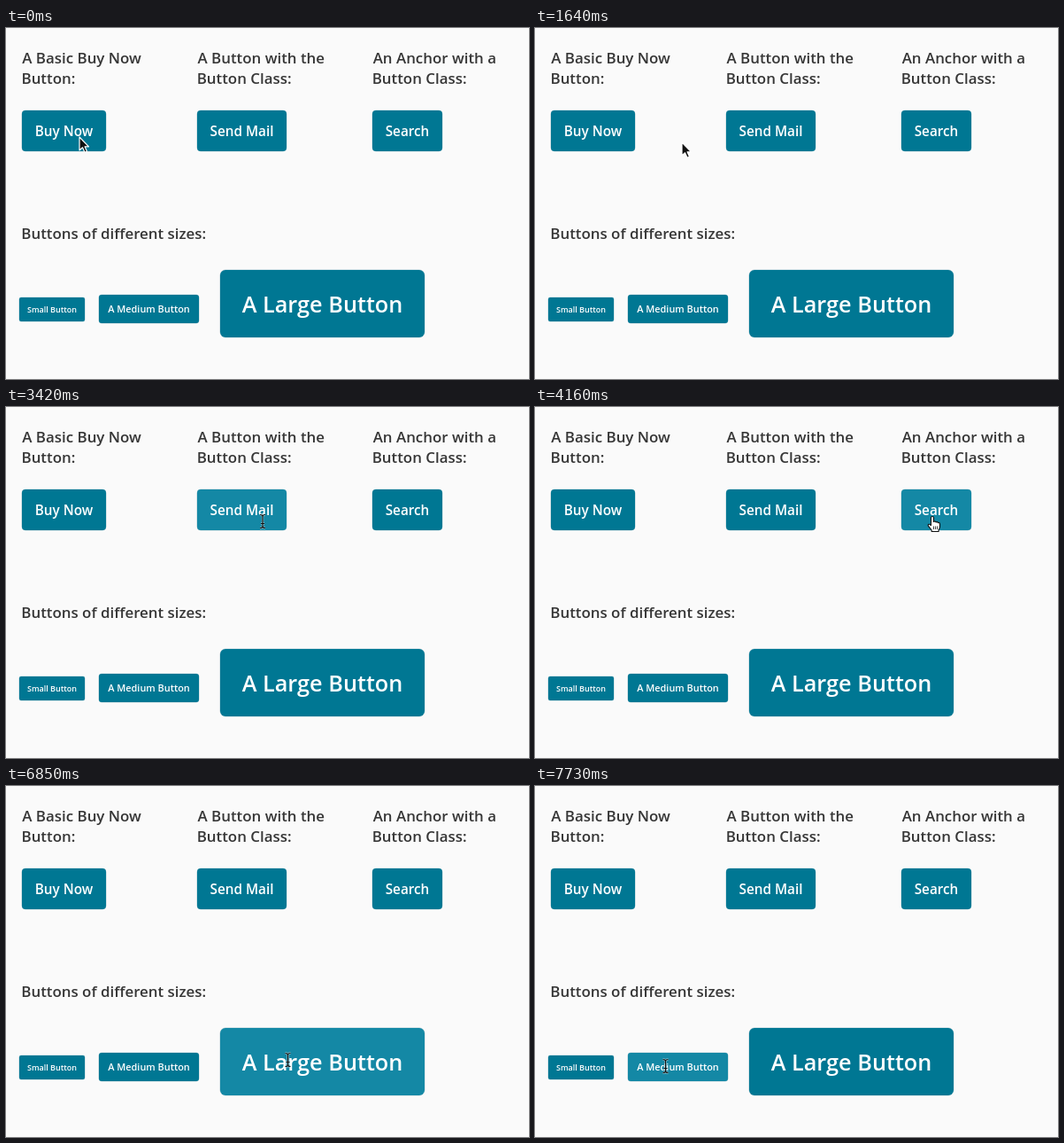
These frames come from a looping animation (591 px wide and 396 px high, 8 s). An HTML page:

```html
<!DOCTYPE html>
<html lang="en">
<head>
<meta charset="utf-8">
<title>Button hover states</title>
<style>
  html, body { margin: 0; width: 100%; height: 100%; overflow: hidden; background: #fafafa; }
  svg { display: block; width: 591px; height: 396px; }
  text { font-family: "Open Sans", "Noto Sans", sans-serif; font-weight: 600; }
  #headings { font-size: 16.9px; fill: #363636; }
  #buttons text { fill: #fff; text-anchor: middle; }
  #buttons rect { stroke: #b5cfd6; stroke-width: 1; paint-order: stroke; }
  .cursor { display: none; stroke-linejoin: round; }
</style>
</head>
<body>
<svg viewBox="0 0 591 396">
  <g id="headings">
    <text x="18.3" y="40">A Basic Buy Now</text>
    <text x="17.5" y="63">Button:</text>
    <text x="216.5" y="40">A Button with the</text>
    <text x="215.7" y="63">Button Class:</text>
    <text x="414.7" y="40">An Anchor with a</text>
    <text x="413.7" y="63">Button Class:</text>
    <text x="17.3" y="238">Buttons of different sizes:</text>
  </g>
  <g id="buttons"></g>
  <g id="arrow" class="cursor">
    <path d="M0,0 V15 L3.5,11.8 L6,17.3 L8.5,16.2 L6.1,10.8 H10.5 Z" fill="#111" stroke="#fff" stroke-width="1.2"/>
  </g>
  <g id="beam" class="cursor" fill="none">
    <path id="beamLine" d="M-3,-7.5 Q0,-7.5 0,-5.5 Q0,-7.5 3,-7.5 M0,-5.5 V5.5 M-3,7.5 Q0,7.5 0,5.5 Q0,7.5 3,7.5 M-2,2.5 H2" stroke="#b9d9e1" stroke-opacity=".75" stroke-width="2.4"/>
    <use href="#beamLine" style="display:none"/>
    <path d="M-3,-7.5 Q0,-7.5 0,-5.5 Q0,-7.5 3,-7.5 M0,-5.5 V5.5 M-3,7.5 Q0,7.5 0,5.5 Q0,7.5 3,7.5 M-2,2.5 H2" stroke="#111" stroke-width="1.2"/>
  </g>
  <g id="hand" class="cursor">
    <path d="M-1.5,10 V1.5 a1.5,1.5 0 0 1 3,0 V6 q1.5,-1.2 2.6,.4 q1.6,-.8 2.4,.7 q2,-.5 2,1.6 V11.5 q0,2 -1.4,3.6 V17 H-.8 V15.5 L-4.6,10.6 q-.6,-2 1.1,-1.8 Z" fill="#fff" stroke="#111" stroke-width="1.1"/>
    <path d="M1.5,11 V14.5 M3.5,11 V14.5 M5.5,11 V14.5" stroke="#111" stroke-width=".8"/>
  </g>
</svg>
<script>
const LOOP = 8000, FADE_IN = 420, FADE_OUT = 150;
const BASE = [0, 119, 147], HOVER = [20, 136, 165];
const $ = id => document.getElementById(id);

// label, x, y, width, height, radius, font size, baseline, hover start, hover end
const buttons = [
  ["Buy Now", 18, 93, 95, 46, 4, 15.3, 122, 150, 1400],
  ["Send Mail", 216, 93, 101, 46, 4, 15.3, 122, 1700, 3330],
  ["Search", 414, 93, 79, 46, 4, 15.3, 122, 3600, 5270],
  ["Small Button", 15, 304, 74, 27, 2, 9, 321, LOOP, LOOP],
  ["A Medium Button", 105, 301, 113, 32, 3, 10.9, 321, 7250, LOOP],
  ["A Large Button", 242, 273, 231, 76, 6, 25.3, 321, 5660, 7040],
].map(([label, x, y, w, h, r, size, base, on, off]) => {
  $("buttons").insertAdjacentHTML("beforeend",
    `<rect x="${x}" y="${y}" width="${w}" height="${h}" rx="${r}"/>
     <text x="${x + w / 2}" y="${base}" font-size="${size}">${label}</text>`);
  return { rect: $("buttons").querySelector("rect:last-of-type"), on, off };
});

// Each run spreads its cursor poses evenly from start to end.
const runs = [
  [0, 0, [["arrow", 83, 123]]],
  [300, 740, [["arrow", 97, 141], ["beam", 97, 131], ["beam", 90, 119], ["beam", 88.5, 116.5]]],
  [1040, 1040, [["beam", 88.5, 117]]],
  [1340, 2380, [["beam", 98, 120], ["arrow", 126, 126], ["arrow", 166, 129], ["beam", 228, 128],
    ["beam", 282, 126], ["beam", 296, 125], ["beam", 270, 125.5], ["beam", 258.5, 125.5]]],
  [3130, 4160, [["beam", 265, 126], ["beam", 290, 129], ["arrow", 332, 140], ["arrow", 384, 145],
    ["hand", 429, 132], ["hand", 453, 128], ["hand", 451, 122], ["hand", 449, 123.5]]],
  [5210, 6110, [["hand", 443, 122], ["arrow", 402, 157], ["arrow", 345, 240], ["arrow", 331, 273],
    ["beam", 322, 298], ["beam", 319, 307], ["beam", 318.5, 308]]],
  [6850, 7730, [["beam", 318.5, 309], ["beam", 290, 328], ["arrow", 226, 355], ["arrow", 175, 344],
    ["beam", 155, 326], ["beam", 149, 318], ["beam", 147.5, 316]]],
];
const poses = runs.flatMap(([start, end, list]) => list.map(([kind, x, y], i) =>
  ({ at: start + (end - start) * i / Math.max(1, list.length - 1), kind, x, y })));

const clamp = v => Math.min(1, Math.max(0, v));

function draw(now) {
  const time = now % LOOP;
  const pose = poses.findLast(p => p.at <= time);
  for (const kind of ["arrow", "beam", "hand"])
    $(kind).style.display = kind === pose.kind ? "inline" : "none";
  $(pose.kind).setAttribute("transform", `translate(${pose.x} ${pose.y})`);
  for (const { rect, on, off } of buttons) {
    const level = clamp((pose.at - on) / FADE_IN) * (1 - clamp((pose.at - off) / FADE_OUT));
    const rgb = BASE.map((c, i) => Math.round(c + (HOVER[i] - c) * level));
    rect.setAttribute("fill", `rgb(${rgb})`);
  }
}

const origin = performance.now();
(function tick() {
  draw(performance.now() - origin);
  requestAnimationFrame(tick);
})();
</script>
</body>
</html>
```
